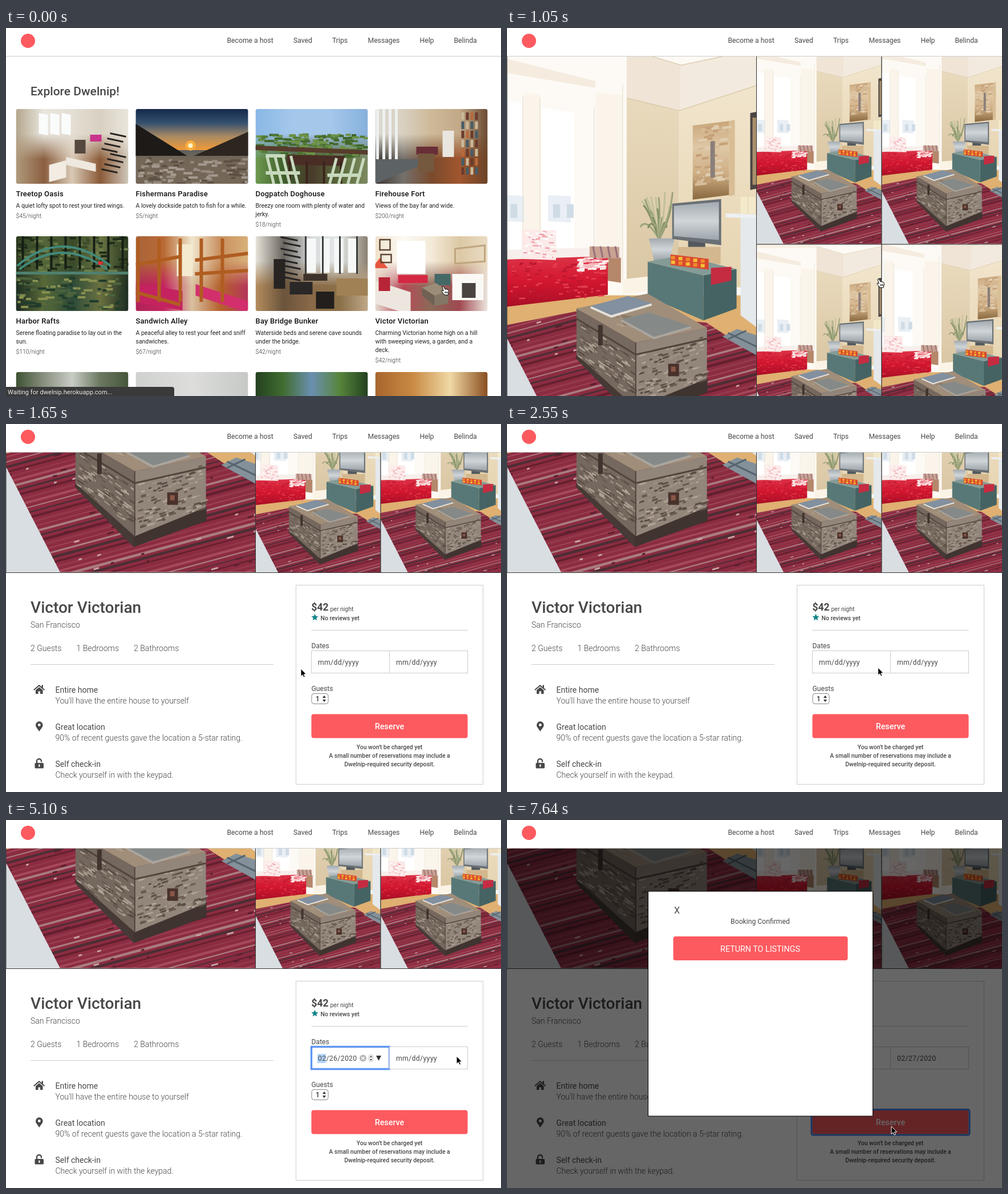
Recreate the animation shown at these times as an HTML page. Size 868x645 px, loop 8000 ms.

```html
<!DOCTYPE html>
<html lang="en">
<head>
<meta charset="utf-8">
<title>Booking a stay</title>
<style>
html, body { margin: 0; width: 100%; height: 100%; overflow: hidden; background: #fff; }
svg { display: block; }
text { font-family: Roboto, sans-serif; white-space: pre; }
</style>
</head>
<body>
<svg id="stage" width="868" height="645" viewBox="0 0 868 645"></svg>
<script>
const $ = id => document.getElementById(id);
const GREY = '#484848', CORAL = '#fc5a5f';

const text = (x, y, s, size = 12.2, weight = 400, fill = GREY, more = '') =>
  `<text x="${x}" y="${y}" font-size="${size}" font-weight="${weight}" fill="${fill}" ${more}>${s}</text>`;
const middle = (...args) => text(...args, 'text-anchor="middle"');
const rect = (x, y, w, h, fill, more = '') =>
  `<rect x="${x}" y="${y}" width="${w}" height="${h}" fill="${fill}" ${more}/>`;
const circle = (x, y, r, fill) => `<circle cx="${x}" cy="${y}" r="${r}" fill="${fill}"/>`;
const path = (d, fill, more = '') => `<path d="${d}" fill="${fill}" ${more}/>`;
const line = (d, stroke, width = 1) => path(d, 'none', `stroke="${stroke}" stroke-width="${width}"`);
const repeat = (n, f) => Array.from({ length: n }, (_, i) => f(i)).join('');
const gradient = (id, colors, direction = 'x2="0" y2="1"') => `<linearGradient id="${id}" ${direction}>` +
  colors.map((c, i) => `<stop offset="${i / (colors.length - 1)}" stop-color="${c}"/>`).join('') + '</linearGradient>';
const triangle = (x, y, w, h, fill) => path(`M${x - w} ${y}h${2 * w}L${x} ${y + h}Z`, fill);

let seed = 7;
const random = () => (seed = seed * 16807 % 2147483647) / 2147483647;

// An upright surface seen at an angle: dy is the drop along its width.
const slab = (fill, x, y, w, dy, h, farHeight = h) =>
  path(`M${x} ${y}l${w} ${dy}v${farHeight}L${x} ${y + h}Z`, fill);
// A crate: two upright faces meeting at the near corner, and a lid.
const crate = (x, y, w1, dy1, w2, dy2, h, near, [lid, left, right]) =>
  slab(left, x, y, w1, dy1, h, near) + slab(right, x + w1, y + dy1, w2, dy2, near, h + 8) +
  path(`M${x} ${y}l${w1} ${dy1} ${w2} ${dy2} ${-w1} ${-dy1}Z`, lid);
const flecks = (n, x, y, w, dy, h, size, colors) => repeat(n, i => {
  const u = random(), length = size * (.4 + random());
  return slab(colors[i % colors.length], x + u * w, y + u * dy + random() * h, length, length * dy / w, size / 3);
});

const rug = 'M0 492 122 468 350 488 438 545V700H95L0 515Z';
const WEAR = ['#9d9083', '#594c44', '#b1a597', '#685a50'];
const room = [
  rect(0, 0, 438, 700, '#fdfaf5'),
  slab('#f5ecdf', 0, 25, 155, 39, 25, 12), rect(0, 0, 210, 14, '#f8f0e4'),
  slab('#efe4d6', 210, 8, 95, 28, 86, 80), slab('#f3eadf', 305, 36, 133, -28, 80, 64),
  slab('url(#alcove)', 210, 94, 92, 22, 325), slab('url(#wall)', 302, 116, 136, -44, 310, 354),
  line('M212 8 306 36 438 8M210 94 302 116 438 72', '#d8c7a5', 1.3),
  repeat(2, i => slab('#fff', i * 92 - 32, 92 + i * 18, 58, 10, 270) + slab('#e9eff4', i * 72, 264, 40, 2, 46) +
    repeat(2, k => rect(6 + i * 75 + k * i * 24, 280, 12, 24, '#cfdce6')) + slab('#faf4ea', 30 + i * 126, 84, 28 + i * 18, 4, 290)),
  line('M203 70V412M153 110V360M58 92V370M28 90V370', '#e3d8c4'),
  rect(0, 440, 438, 110, '#dfb071'), slab('#fbf4e6', 203, 412, 45, -5, 26),
  rect(0, 515, 438, 185, '#d9dee2'), path(rug, '#8b2c41'),
  `<g clip-path="url(#rugArea)">${repeat(44, i => line(`M0 ${480 + i * 9}l438 -118`,
    ['#64202f', '#a64a5b', '#4b2e35', '#94384c', '#a97c80'][i * 3 % 5], 1 + random() * 4))}
    ${flecks(70, 0, 500, 438, -118, 320, 9, ['#c9a5a4', '#59202e'])}</g>`,
  slab('#f7efeb', 0, 360, 200, -5, 20), slab('#b5876b', 160, 368, 40, 6, 44),
  slab('url(#couch)', 0, 377, 177, -6, 83, 68), flecks(90, 0, 382, 170, -6, 66, 8, ['#e53c50', '#bd1730']),
  flecks(45, 122, 374, 46, -4, 22, 11, ['#fff0ee', '#f6b9bd']),
  slab('#fbeae8', 26, 324, 60, 2, 52), flecks(50, 28, 326, 52, 2, 46, 7, ['#f0a0aa', '#fff']),
  slab('#c9a292', 145, 354, 52, 1, 20), repeat(4, i => line(`M${151 + i * 13} 354l4 20`, '#96707a', 3)),
  repeat(22, i => line(`M267 342Q${245 + i * 2} ${285 + random() * 30} ${234 + i * 2.7} ${258 + random() * 66}`, ['#9aa37b', '#c0c19a', '#808d65'][i % 3], 3)),
  path('M249 340H294L286 379H258Z', 'url(#steel)'),
  slab('url(#canvas)', 326, 142, 64, -8, 130), slab('#d9bd95', 390, 134, 10, -2, 132),
  flecks(60, 328, 146, 52, -7, 100, 13, ['#e0cdb0', '#c4a078', '#d5bc98']), slab('#8b7f79', 357, 170, 8, -1, 64),
  slab('#4b4643', 427, 120, 11, -2, 135), slab('#a98f6c', 431, 128, 7, 0, 118),
  slab('#d3b78e', 300, 355, 75, 0, 30), rect(318, 340, 30, 15, '#53585d'),
  slab('#6a7075', 290, 279, 86, -8, 62, 81), slab('url(#steel)', 293, 283, 79, -7, 53, 67),
  crate(247, 381, 98, 24, 58, -11, 61, 79, ['#849b96', '#587877', '#456363']),
  slab('#c52c42', 358, 392, 36, -2, 30, 24), slab('#d9492f', 287, 368, 67, 8, 19),
  repeat(10, i => rect(288 + i % 5 * 13, 371 + i % 5 * 1.5 + (i > 4) * 8, 7, 6, i % 2 ? '#f5be35' : '#ef8c2b')),
  repeat(2, i => rect(410 + i * 14, 267, 12, 30, '#f3eacb')), slab('#edf0f2', 384, 296, 54, 2, 7), slab('#e5e9ec', 410, 304, 28, 0, 171, 192),
  path('M378 512 404 499 438 510V545Z', '#84919a'), line('M388 506 438 530M388 517 420 502', '#56646d', 3),
  crate(122, 534, 102, 102, 128, -52, 18, 20, ['#3a302d', '#453a35', '#3f3430']),
  crate(122, 463, 104, 60, 125, -26, 81, 114, ['#a08e7a', '#75685e', '#92857a']),
  flecks(110, 124, 482, 96, 66, 68, 9, WEAR), flecks(130, 228, 546, 116, -34, 78, 9, WEAR), flecks(50, 175, 462, 100, 28, 24, 9, ['#ad9d89', '#8b7965']),
  line('M122 481 226 544 351 516', '#51443c', 3), line('M226 523V636', '#50443c', 2),
  rect(160, 492, 8, 36, '#40342e'), rect(283, 560, 19, 22, '#49322b'), rect(288, 565, 8, 9, '#8a5746'),
  path('M147 459 213 441 254 454 183 475Z', '#8290a0'), line('M147 461 183 477 254 456', '#e5e1da', 4),
  path('M201 482 250 470 323 494 258 513Z', '#858a89'), line('M201 484 258 515 323 496', '#aaa59d', 4),
].join('');

// A soft picture: wall tones from left to right that give way to floor tones below.
const scene = (wall, floor = wall, details = '') => ({ tones: [wall, floor], details });
const frames = (n, x, step, top, bottom, color, width) => line(repeat(n, i => `M${x + i * step} ${top}V${bottom}`), color, width);
const scenes = [
  scene('#b5a68c #e9e7e0 #e4ded3 #d8d0c2 #eae5dc', '#b09a7d #8a5f40 #d9c9b5 #8a5a38 #cfc7ba',
    repeat(3, i => slab('#fafcfc', 40 + i * 20, 7, 16, 3, 36)) + rect(130, 45, 20, 12, '#c9338b') + rect(103, 54, 19, 24, '#55483e') +
    slab('#f2ece2', 58, 98, 30, -8, 30) + slab('#eee8de', 88, 84, 52, 12, 14) + repeat(8, i => slab('#26221f', 150 + i % 4 * 5, 104 - i * 9, 28, 6, 3))),
  scene('#34506e', '#746757', rect(0, 0, 197, 72, 'url(#dusk)') + circle(96, 64, 9, '#f8ad40') + circle(96, 64, 4, '#fff5c8') +
    triangle(0, 82, 90, -56, '#1d1a18') + triangle(197, 82, 95, -42, '#2d2520') + flecks(90, 0, 84, 197, 0, 46, 12, ['#978b80', '#5d5045', '#a59a90'])),
  scene('#8ab8e6 #a5c8ea #a5c8ea #86b0dc', '#6f9a50 #3f5f2c #4a3a2a #5a6a3c #7d8a60',
    flecks(160, 0, 42, 190, 0, 40, 12, ['#41672c', '#6d9245', '#547b38']) + slab('#573c2c', 0, 64, 197, 8, 8) +
    slab('#4a2e26', 55, 80, 102, 2, 18) + frames(4, 60, 30, 92, 131, '#3b241b', 4) + repeat(4, i => line(`M${20 + i * 14} 82l12 49M${130 + i * 16} 131l12 -45`, '#c7d9bd', 5)) + line('M18 82H52M18 112H78M126 116H185', '#c7d9bd', 6)),
  scene('#dcdad4 #d9d0c0 #cdb998 #c2a988 #6b4a33', '#3a3531 #75716c #7a4a2c #a0562e #6b4428',
    frames(4, 4, 11, 0, 90, '#eef0f0', 5) + rect(118, 38, 20, 46, '#e9e6df') + rect(72, 66, 38, 14, '#682e37') + slab('#5d6265', 0, 88, 82, 0, 43, 10) + rect(75, 78, 28, 32, '#75593f') +
    repeat(28, i => rect(151 + i % 4 * 8, 6 + (i >> 2) * 16, 5, 13, ['#c9b89a', '#6b3b2c', '#455c68', '#b9683c'][i * 5 % 7 % 4]))),
  scene('#2c3a20 #55663a #3a4a28 #6a7444 #2a3a20', '#1c2c22 #5a6a38 #2c4a38 #6a7040 #1c2c22',
    flecks(120, 0, 0, 190, 0, 60, 12, ['#202d19', '#6d7d48', '#3a4c2a']) + frames(8, 12, 25, 0, 58, '#151e14', 4) + rect(0, 62, 197, 5, '#4e806f') +
    line('M2 52Q80-16 166 52M6 58Q80 0 160 58', '#42897b', 4) + rect(144, 44, 8, 6, '#d33') + flecks(90, 0, 70, 190, 0, 58, 12, ['#203c2c', '#4c633c', '#879050'])),
  scene('#a8643a #b96a35 #f0e6cc #c99060 #d8b078', '#b02458 #c42360 #d8c0a0 #b5622e #b5345a',
    rect(72, 14, 28, 56, '#f4ead0') + slab('#c42360', 0, 82, 82, 14, 34) + slab('#d22f6c', 105, 84, 92, 30, 20) + frames(5, 4, 37, 4, 115, '#b05d21', 6) + line('M0 50 76 36M0 98 78 120M104 42 197 30M104 66 197 60', '#b05d21', 6)),
  scene('#e8e4da #6a645e #d8dcdc #e4e8e8 #8a8070', '#b58d5d #6a543c #8a6a48 #8a7048 #c0a888',
    frames(4, 98, 24, 4, 64, '#f6f8f8', 16) + frames(4, 88, 30, 0, 66, '#3d3f3d', 3) + rect(32, 40, 20, 52, '#282422') + repeat(8, i => slab('#222', 44 + i % 2 * 5, i * 10, 30, 6, 3)) +
    rect(84, 66, 42, 12, '#3e342b') + slab('#2a2827', 60, 80, 40, 0, 22) + rect(142, 74, 55, 30, '#a08055') + rect(106, 97, 32, 30, '#221f1d')),
  scene('#efe2cc #fdfaf4 #f4ead8 #dcc8a4 #eadcc4', '#e4dad0 #b84a56 #8a6a58 #a04850 #ece6de',
    rect(38, 8, 50, 58, '#fff') + rect(40, 68, 52, 14, '#d52842') + slab('#ede6de', 0, 78, 62, 20, 40) + rect(6, 72, 20, 24, '#b82438') + triangle(8, 56, 14, -18, '#e8563e') +
    line('M8 6h18v18H8zM10 32h18v14H10z', '#5d4634', 2.5) + line('M140 22l52 -6v28l-52 4z', '#c0a680', 3) + rect(135, 66, 55, 46, '#fbf9f5') + rect(152, 82, 24, 26, '#4a4440') +
    rect(104, 66, 28, 20, '#456966') + crate(82, 90, 22, 14, 24, -8, 14, 18, ['#9b8c77', '#6f6254', '#857766'])),
  scene('#3d5232 #8a9080 #c8ccc4 #6a7860 #46563a'),
  scene('#cfd1ce #dddedb #c6c9c6'),
  scene('#23401f #426d31 #6a90b0 #57853c #23401f', '#2a4a22 #426d31 #913f31 #57853c #2a4a22'),
  scene('#a8652d #c98a44 #f0d8a4 #8a4e20'),
];
const scenery = scenes.map(({ tones, details }, i) => tones.map((colors, k) =>
  gradient(`tone${i}-${k}`, colors.split(' ').flatMap((c, n, all) => all.length > 1 ? c : [c, c]), '') +
  rect(0, 0, 197, 131, `url(#tone${i}-${k})`, k ? 'mask="url(#fade)"' : '')).join('') + details);

const listings = [
  ['Treetop Oasis', 45, 'A quiet lofty spot to rest your tired wings.'],
  ['Fishermans Paradise', 5, 'A lovely dockside patch to fish for a while.'],
  ['Dogpatch Doghouse', 18, 'Breezy one room with plenty of water and', 'jerky.'],
  ['Firehouse Fort', 200, 'Views of the bay far and wide.'],
  ['Harbor Rafts', 110, 'Serene floating paradise to lay out in the', 'sun.'],
  ['Sandwich Alley', 67, 'A peaceful alley to rest your feet and sniff', 'sandwiches.'],
  ['Bay Bridge Bunker', 42, 'Waterside beds and serene cave sounds', 'under the bridge.'],
  ['Victor Victorian', 42, 'Charming Victorian home high on a hill', 'with sweeping views, a garden, and a', 'deck.'],
];

const card = (picture, i) => {
  const x = 17.5 + i % 4 * 210, y = [142, 365, 603][i >> 2];
  let out = `<g transform="translate(${x} ${y})"><g clip-path="url(#thumb)">${picture}</g>`;
  if (listings[i]) {
    const [title, price, ...about] = listings[i];
    out += text(0, 153, title, 13, 500, '#111', 'letter-spacing=".2"') +
      about.map((s, n) => text(0, 173 + n * 15, s, 10.45, 400, '#222')).join('') +
      text(0, 176 + about.length * 15, `$${price}/night`, 10.45, 300, '#333');
  }
  return out + '</g>';
};

const photo = (id, x, y, w, h) =>
  `<svg x="${x}" y="${y}" width="${w}" height="${h}" viewBox="0 0 438 700"><use id="${id}" href="#room"/></svg>` +
  rect(x, y + .5, w, h, 'none', 'stroke="#333"');

const feature = (y, title, about) => text(86.5, y, title, 14) + text(86.5, y + 19, about, 14, 300);
const arrows = (x, y, size, gap) => triangle(x, y - gap, size, -size * 1.4, '#333') + triangle(x, y + gap, size, size * 1.4, '#333');
const star = (x, y, r) => path('M' + Array.from({ length: 10 }, (_, i) => {
  const a = i * Math.PI / 5, d = i % 2 ? r * .45 : r;
  return `${x + d * Math.sin(a)} ${y - d * Math.cos(a)}`;
}).join('L') + 'Z', '#128489');

const field = i => `<g transform="translate(${i * 137} 0)">
  ${rect(535.5, 397.5, 137, 39, '#fff', 'stroke="#ccc"')}
  <g id="focus${i}">${rect(535.5, 397.5, 137, 39, 'none', 'stroke="#a9c6fb" stroke-width="4"')}
    ${rect(535.5, 397.5, 137, 39, 'none', 'stroke="#4384ec" stroke-width="2"')}
    <rect id="mark${i}" x="546" y="410" height="16" fill="#b2d5fd"/>
    ${rect(636.5, 411.5, 7, 12, '#f6f6f6', 'stroke="#bbb" rx="3"')}${arrows(640, 417.5, 2, 1.5)}${triangle(653.5, 413, 4.5, 9, '#333')}
    <g id="clear${i}">${circle(626, 417.5, 6, '#b5b5b5')}${line('M623.5 415l5 5m0-5l-5 5', '#fff', 1.5)}</g></g>
  <text id="date${i}" x="547" y="422" font-size="12.2" fill="${GREY}" letter-spacing=".37"></text></g>`;

const dayX = i => 561 + i * 29.75;
const calendar = `<g id="calendar">${rect(536, 437.5, 228.5, 159, '#fff', 'stroke="#aaa"')}
  ${text(549, 461.5, 'February 2020', 11.4, 400, '#000')}${triangle(631, 456, 3, 4, '#111')}
  ${repeat(3, i => rect(685.5 + i * 24.5, 447, 20, 20, '#e9e9e9', 'stroke="#bbb"'))}
  ${path('M697.5 454v6l-4-3zM742.5 454v6l4-3z', '#444')}${circle(720, 457, 3, '#444')}
  ${rect(545.5, 477, 209, 109.5, '#fff', 'stroke="#3f8ad8"')}${rect(546, 477.5, 208, 20, '#f1f1f1')}${line('M546 497.5H754', '#ccc')}
  ${rect(635.5, 569.5, 29, 16, 'none', 'stroke="#bbb"')}
  ${['Sun', 'Mon', 'Tue', 'Wed', 'Thu', 'Fri', 'Sat'].map((d, i) => middle(dayX(i), 492, d, 11.2, 400, '#111')).join('')}
  ${repeat(35, i => middle(dayX(i % 7), 511 + (i / 7 | 0) * 17.5, i < 6 ? 26 + i : i - 5, 11.5, 400, i < 6 ? '#bbb' : '#000'))}</g>`;

const details = `<g transform="translate(0 490)">
  ${text(43, 331, 'Victor Victorian', 28, 500)}${text(43, 357, 'San Francisco', 14, 300)}
  ${text(43, 398, '2 Guests', 14, 300)}${text(123.5, 398, '1 Bedrooms', 14, 300)}${text(224, 398, '2 Bathrooms', 14, 300)}
  ${line('M43 421.5H469M535.5 361.5H809.5', '#ccc')}
  ${feature(471, 'Entire home', "You'll have the entire house to yourself")}
  ${feature(536, 'Great location', '90% of recent guests gave the location a 5-star rating.')}
  ${feature(600.5, 'Self check-in', 'Check yourself in with the keypad.')}
  ${line('M48.8 466.2 58 458.3 67.4 466.2', GREY, 2)}${path('M52 466.5 58.1 461.3 64.5 466.5V473H60V468.5H56.5V473H52ZM62.5 457.5h2.5v5h-2.5z', GREY)}
  ${path('M58.3 539C55 533.5 52 531.5 52 527.6a6.3 6.3 0 0 1 12.6 0C64.6 531.5 61.6 533.5 58.3 539Z', GREY)}${circle(58.3, 527.5, 2.4, '#fff')}
  ${rect(50.5, 594, 15.5, 9.5, GREY, 'rx="1.5"')}${line('M54 595V591a4 4 0 0 1 8 0v1.5', GREY, 2.3)}${rect(57.2, 596.5, 2.2, 4.5, '#fff', 'rx="1"')}
  ${rect(508.5, 282.5, 328, 349, 'none', 'stroke="#ccc"')}
  ${text(535.5, 327, '$42', 17.5, 700)}${text(568.5, 327.5, 'per night', 10.45)}${star(541.5, 339, 6.4)}
  ${text(551.5, 344, 'No reviews yet', 10.45, 500)}${text(535.5, 393, 'Dates')}${field(0)}${field(1)}
  ${text(535.5, 467.5, 'Guests')}${rect(536, 472.5, 29, 18, '#fff', 'rx="4" stroke="#888"')}${text(543, 486, '1', 12.2, 400, '#000')}${arrows(558, 481.5, 3, 1.5)}
  ${rect(535.5, 508.5, 274, 42, CORAL, 'rx="4"')}${middle(672.5, 535, 'Reserve', 14.3, 500, '#fff')}
  <g id="focus2">${rect(534, 507.5, 277, 44.5, 'none', 'rx="3" stroke="#3f82f0" stroke-width="3"')}</g>
  ${["You won't be charged yet", 'A small number of reservations may include a', 'Dwelnip-required security deposit.']
    .map((s, i) => middle(672.5, 570 + i * 15, s, 10.4, 500, GREY)).join('')}${calendar}</g>`;

const nav = { 387.5: 'Become a host', 504: 'Saved', 572: 'Trips', 634.5: 'Messages', 725.5: 'Help', 785.5: 'Belinda' };

$('stage').innerHTML = `<defs>
  ${gradient('alcove', ['#e9dabd', '#d9c5a2'])}${gradient('wall', ['#f1e5cd', '#e6d4b0'])}${gradient('couch', ['#dc3348', '#d3162f', '#a90f26'])}
  ${gradient('steel', ['#a3abb1', '#d0d5d8', '#9ca5ab'])}${gradient('canvas', ['#c9a579', '#dfc8a6', '#cfae84', '#8a683f'])}
  ${gradient('dusk', ['#15294b', '#34506e', '#a98a63', '#f29a35'])}${gradient('fadeTones', ['#000', '#000', '#fff', '#fff'])}
  <mask id="fade">${rect(0, 0, 197, 131, 'url(#fadeTones)')}</mask>
  <clipPath id="thumb">${rect(0, 0, 197, 131, '#000', 'rx="4"')}</clipPath>
  <clipPath id="rugArea">${path(rug, '#000')}</clipPath><g id="room">${room}</g></defs>
  ${rect(0, 0, 868, 645, '#fff')}
  <g id="list">${text(43, 118, 'Explore Dwelnip!', 21, 500)}${scenery.map(card).join('')}
    ${path('M0 629H291q4 0 4 4V645H0Z', '#3a3a3a')}${text(3, 642, 'Waiting for dwelnip.herokuapp.com...', 11.1, 400, '#e8e8e8')}</g>
  <g id="page">${photo('p0', 0, 50, 437.5, 700)}${repeat(4, i => photo('p' + (i + 1), 437.5 + i % 2 * 219.5, 50 + (i >> 1) * 350, 219.5, 350))}${details}</g>
  <g id="modal">${rect(0, 50, 868, 595, '#000', 'opacity=".6"')}${rect(247.5, 125, 394, 394, '#fff', 'stroke="#000"')}
    ${text(293, 164, 'X', 16)}${middle(444, 182, 'Booking Confirmed', 12.2, 400, GREY)}
    ${rect(291.5, 204, 306, 42, CORAL, 'rx="4"')}${middle(444, 230.5, 'RETURN TO LISTINGS', 14.3, 400, '#fff')}</g>
  ${rect(0, 0, 868, 50, '#fff')}${line('M0 49.5H868', '#ccc')}${circle(38.5, 22.5, 12.5, CORAL)}
  ${Object.entries(nav).map(([x, s]) => text(x, 26, s)).join('')}
  <path id="cursor"/>`;

const cursors = {
  arrow: ['M0 0V13.5L3.1 10.7 5.2 15.2 7.4 14.2 5.4 9.8H9.6Z', '#000', '#fff'],
  hand: ['M-5-6.5Q-3-8-2-6L0-2Q1-3 2-2 3.2-2.8 4-1.6 5.5-2 6-.5L6.3 3 5 8H-1L-5 3Q-7.5 1-5.5 0L-2.8 1ZM0 2v3M2 2v3M4 2v3', '#fff', '#000'],
  beam: ['M-3-7Q0-7 0-5V5Q0 7-3 7M3-7Q0-7 0-5M0 5Q0 7 3 7', 'none', '#222'],
};

// Each move is [begin, end, ...values]; between moves the value rests.
const pointer = [[0, 0, 770, 460], [0, 750, 717, 449], [900, 1350, 531, 443], [1350, 1650, 517, 429], [1650, 1950, 637, 487], [1950, 2700, 654, 412],
  [3000, 3450, 640, 497], [3450, 4050, 649, 577], [4200, 5100, 790, 414], [5400, 6290, 816, 573], [6440, 6590, 738, 577], [6590, 7190, 674, 537]];
const scroll = [[0, 0, 0], [900, 1350, 64], [1350, 1650, 490]];
const zooms = { p3: [[0, 0, 1], [1050, 1350, 1.08], [1500, 1950, 1]], p4: [[0, 0, 1], [150, 600, 1.1], [1050, 1350, 1]] };

const valueAt = (moves, t) => moves.reduce((from, [begin, end, ...to]) => {
  const p = t >= end ? 1 : Math.max(0, (t - begin) / (end - begin));
  return to.map((v, i) => from.length ? from[i] + (v - from[i]) * p : v);
}, []);

const show = (id, on) => $(id).style.display = on ? '' : 'none';
const set = (id, attributes) => Object.entries(attributes).forEach(([name, v]) => $(id).setAttribute(name, v));
const between = (t, a, b) => t >= a && t < b;

function draw(now) {
  const ms = now % 8000, start = ms < 6290 ? 0 : 6290;
  const t = start + Math.floor((ms - start) / 150) * 150;
  show('list', t < 150);
  show('page', t >= 150);
  show('modal', t >= 7640);
  set('page', { transform: `translate(0 ${-valueAt(scroll, t)[0]})` });
  for (const id in zooms)
    set(id, { transform: `translate(219 350) scale(${valueAt(zooms[id], t)[0]}) translate(-219 -350)` });

  [[3000, 5400, 4350, '02/26/2020'], [5400, 7490, 6590, '02/27/2020']].forEach(([open, blur, pick, date], i) => {
    const picked = t >= pick;
    show('focus' + i, between(t, open, blur));
    show('clear' + i, picked);
    set('mark' + i, { width: picked ? 15 : 23 });
    $('date' + i).textContent = picked ? date : 'mm/dd/yyyy';
  });
  show('focus2', t >= 7490);
  show('calendar', between(t, 3000, 4350) || between(t, 5400, 6590));
  set('calendar', { transform: `translate(${t < 5400 ? 0 : 137} 0)` });

  const kind = t < 1500 || between(t, 6890, 7640) ? 'hand' : between(t, 6590, 6890) ? 'beam' : 'arrow';
  const [d, fill, stroke] = cursors[kind];
  set('cursor', { d, fill, stroke, transform: `translate(${valueAt(pointer, t).join(' ')})` });
}

function tick() {
  draw(performance.now());
  requestAnimationFrame(tick);
}
tick();
</script>
</body>
</html>
```
